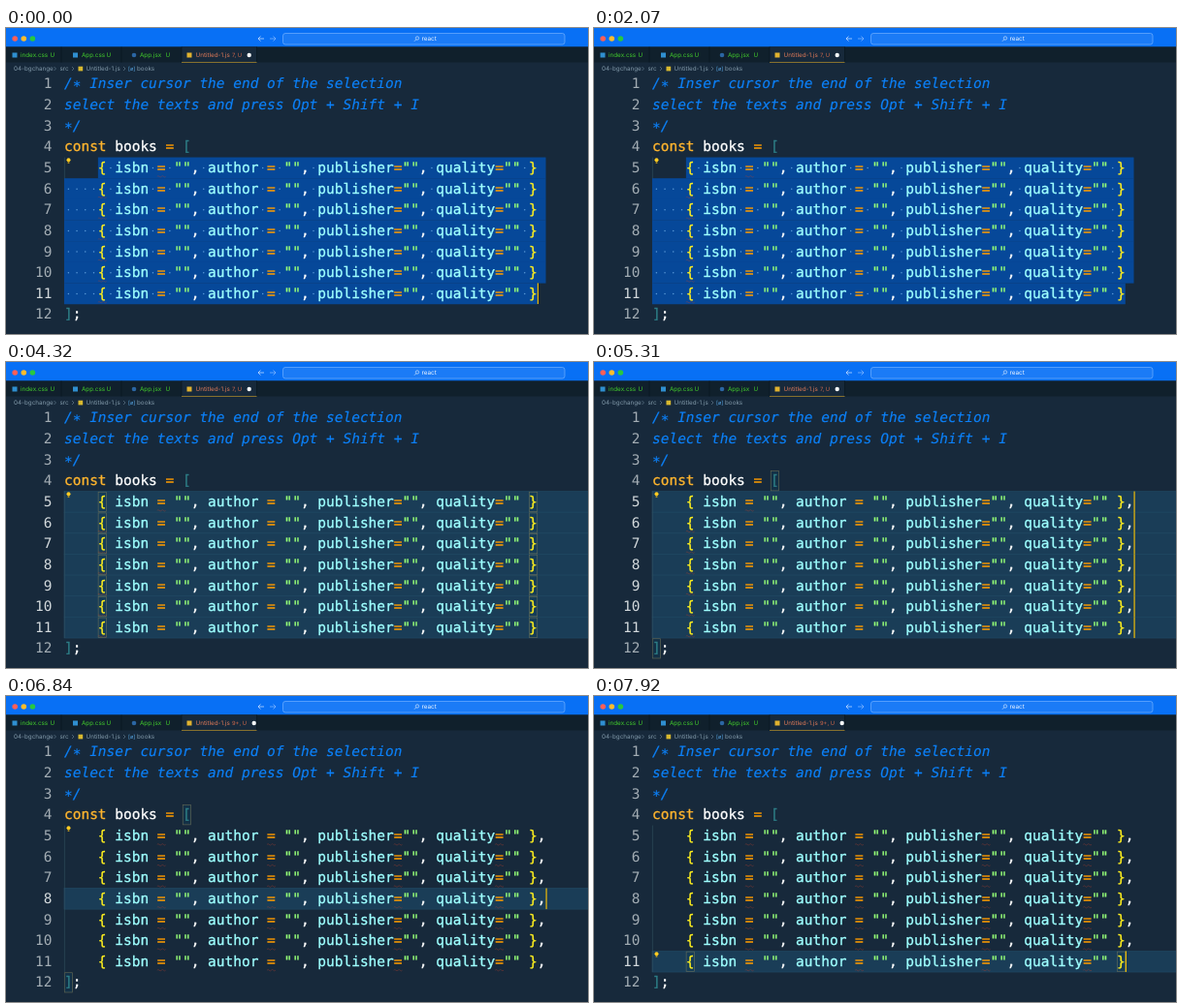
Animation, 600 px wide and 316 px high, one loop 8000 ms. Source, as an HTML page:

```html
<!DOCTYPE html>
<html lang="en">
<head>
<meta charset="utf-8">
<title>Multi-cursor editing</title>
<style>
  html, body { margin: 0; width: 100%; height: 100%; overflow: hidden; background: #17293b; }
  svg { display: block; width: 100vw; height: 100vh; }
  text { white-space: pre; text-rendering: geometricPrecision; }
  .code { font: 14.47px "DejaVu Sans Mono", "Liberation Mono", monospace; stroke-width: 0.3px; }
  .comment { font-style: italic; stroke-width: 0.15px; }
  .ui { font: 6.3px Inter, "Liberation Sans", sans-serif; }
</style>
</head>
<body>
<svg id="stage" viewBox="0 0 600 316"></svg>
<script>
const LOOP = 8000, BLINK = 500;
const LEFT = 60, TOP = 47, CHAR = 8.711, ROW = 21.64, BASELINE = 15.4;
const FIRST = 5, LAST = 11;
const ENTRY = '    { isbn = "", author = "", publisher="", quality="" }';
const END = ENTRY.length;
const EQUALS = [...ENTRY].flatMap((c, i) => c === '=' ? [i] : []);
const entries = Array.from({ length: LAST - FIRST + 1 }, (_, i) => FIRST + i);

const colX = col => LEFT + col * CHAR;
const rowY = row => TOP + (row - 1) * ROW;
const rect = (x, y, w, h, fill, extra = '') =>
  `<rect x="${x}" y="${y}" width="${w}" height="${h}" fill="${fill}" ${extra}/>`;
const circle = (x, y, r, fill) => `<circle cx="${x}" cy="${y}" r="${r}" fill="${fill}"/>`;
const path = (d, stroke, width = 0.8) =>
  `<path d="${d}" fill="none" stroke="${stroke}" stroke-width="${width}"/>`;
const label = (x, y, s, fill, extra = '') =>
  `<text class="ui" x="${x}" y="${y}" fill="${fill}" ${extra}>${s}</text>`;
// Asterisks sit at mid-height, as in the editor's typeface.
const lowerStars = s => s.replace(/\*/g, '<tspan dy="2.5">*</tspan><tspan dy="-2.5">\u200b</tspan>');
const code = (row, col, s, fill, cls = '') =>
  `<text class="code ${cls}" x="${colX(col)}" y="${rowY(row) + BASELINE}" fill="${fill}" stroke="${fill}">${lowerStars(s)}</text>`;
const group = (id, content) => `<g id="${id}">${content}</g>`;

const COLORS = {
  comment: '#0c80f8', keyword: '#ffb52e', name: '#9effff', string: '#96ff78',
  operator: '#ff9d00', brace: '#fff01f', plain: '#ffffff', outer: '#2d7d86', caret: '#ffc600'
};

function tokenColor(token) {
  if (/[{}]/.test(token)) return COLORS.brace;
  if (token === '=') return COLORS.operator;
  if (token === ',') return COLORS.plain;
  return token[0] === '"' ? COLORS.string : COLORS.name;
}

const entryCode = row => [...ENTRY.matchAll(/\w+|""|[{}=,]/g)]
  .map(m => code(row, m.index, m[0], tokenColor(m[0]))).join('');

const bracketBox = (row, col) =>
  rect(colX(col) + 0.3, rowY(row) + 0.7, CHAR - 0.4, ROW - 1.4, '#0d3a5866',
    'stroke="#7d7d5c" stroke-opacity=".7" stroke-width=".7"');

const squiggle = (row, col) =>
  path(`M${colX(col)} ${rowY(row) + 19.8}q1.1 -1.4 2.2 0t2.2 0t2.2 0t2.2 0`, '#b5412f88', 0.7);

function selection(row) {
  const from = row === FIRST ? 4 : 0;
  const to = row === LAST ? END : END + 1;
  const dots = [...ENTRY].map((c, i) =>
    c === ' ' && i >= from ? circle(colX(i + 0.5), rowY(row) + 11, 0.75, '#5c9bd8') : '').join('');
  return rect(colX(from), rowY(row), (to - from) * CHAR, ROW + 0.2, '#064899') + dots;
}

const bulb = row => circle(64.5, rowY(row) + 2.8, 2, '#ffcc22') +
  rect(63.6, rowY(row) + 4.8, 1.8, 1.4, '#d8a91a');

function windowChrome() {
  const lights = ['#ff5f57', '#febc2e', '#28c840'].map((c, i) => circle(9.2 + i * 9.1, 11, 2.8, c)).join('');
  const square = (x, fill) => rect(x, 25.5, 5, 5, fill);
  const tab = (x, name, uX) => label(x, 30, name, '#42cc2c') + label(uX, 30, 'U', '#42cc2c');
  const crumb = (x, s) => label(x, 44.3, s, '#8199a9');
  const chevron = x => path(`M${x} 40l2 2l-2 2`, '#71899a', 0.6);
  return rect(0, 0, 600, 19.5, '#0870f5') + lights +
    path('M266 11h-6m2.5 -2.5l-2.5 2.5l2.5 2.5', '#d5e7ff', 0.7) +
    path('M272 11h6m-2.5 -2.5l2.5 2.5l-2.5 2.5', '#8cbcff', 0.7) +
    rect(285.5, 5.5, 290.5, 11.5, '#1b7bf6', 'rx="2.5" stroke="#71b0ff" stroke-width=".7"') +
    `<circle cx="424" cy="10.5" r="1.7" fill="none" stroke="#e6f1ff" stroke-width=".6"/>` +
    path('M422.8 11.8l-1.8 1.9', '#e6f1ff', 0.6) + label(428.5, 13.3, 'react', '#f1f7ff') +
    rect(0, 19.5, 600, 16, '#10202c') + rect(181, 19.5, 77.5, 16, '#17293b') +
    [57, 119, 181, 258.5].map(x => path(`M${x} 19.5v16`, '#0a1720', 0.7)).join('') +
    path('M181 35.5h77.5', '#b8922b', 0.7) +
    square(6.5, '#2f8fd0') + tab(15, 'index.css', 45.5) +
    square(69, '#2f8fd0') + tab(78, 'App.css', 103.5) +
    circle(132, 28, 2.3, '#2b66a3') + tab(138, 'App.jsx', 164.5) +
    square(186.5, '#e0b22f') + label(195.5, 30, 'Untitled-1.js', '#df7a58') +
    `<text id="errors" class="ui" x="233" y="30" fill="#d0694c" style="font-size:5.8px"></text>` +
    `<circle id="dirty" cy="28" r="2.2" fill="#f4f7f8"/>` +
    crumb(8, '04-bgchange') + chevron(49.5) + crumb(55.5, 'src') + chevron(68) +
    rect(74.5, 39.7, 4.7, 4.7, '#d8b92f') + crumb(82.5, 'Untitled-1.js') + chevron(121) +
    label(126, 44, '[ø]', '#58a9e8', 'style="font-size:5.5px"') + crumb(135, 'books');
}

const lineNumbers = Array.from({ length: 12 }, (_, i) =>
  `<text id="num${i + 1}" class="code" x="47.5" y="${rowY(i + 1) + BASELINE}" text-anchor="end">${i + 1}</text>`).join('');

const fixedCode =
  code(1, 0, '/* Inser cursor the end of the selection', COLORS.comment, 'comment') +
  code(2, 0, 'select the texts and press Opt + Shift + I', COLORS.comment, 'comment') +
  code(3, 0, '*/', COLORS.comment, 'comment') +
  code(4, 0, 'const', COLORS.keyword) + code(4, 6, 'books', COLORS.plain) +
  code(4, 12, '=', COLORS.operator) + code(4, 14, '[', COLORS.outer) +
  code(12, 0, ']', COLORS.outer) + code(12, 1, ';', COLORS.plain);

const $ = id => document.getElementById(id);
$('stage').innerHTML =
  rect(0, 0, 600, 316, '#17293b') + windowChrome() +
  entries.map(r => group('line' + r,
    rect(LEFT, rowY(r), 542, ROW, '#1a3d57', 'stroke="#214a64" stroke-width=".6"'))).join('') +
  path(`M60.4 ${rowY(FIRST)}V${rowY(LAST + 1)}`, '#33505f', 0.6) +
  group('selected', entries.map(selection).join('')) +
  entries.map(r => group('boxes' + r, bracketBox(r, 4) + bracketBox(r, END - 1))).join('') +
  group('outerBoxes', bracketBox(4, 14) + bracketBox(12, 0)) +
  lineNumbers + fixedCode + entries.map(entryCode).join('') +
  entries.map(r => group('comma' + r, code(r, END, ',', COLORS.plain))).join('') +
  group('fewErrors', entries.map(r => squiggle(r, r === FIRST ? EQUALS[0] : 4)).join('')) +
  group('manyErrors', entries.flatMap(r => EQUALS.map(c => squiggle(r, c))).join('')) +
  entries.map(r => rect(0, rowY(r), 1.1, ROW, COLORS.caret, `id="caret${r}"`)).join('') +
  group('bulb5', bulb(FIRST)) + group('bulb11', bulb(LAST));

// Each step overrides the state left by the steps before it.
const steps = [
  { at: 0, rows: [LAST], col: END, selected: true, blinkFrom: -460, bulb: FIRST },
  { at: 2520, rows: entries, selected: false, braces: true, blinkFrom: 2520 },
  { at: 5040, col: END + 1, commas: true, braces: false, outer: true, blinkFrom: 5040 },
  { at: 5760, many: true },
  { at: 6120, rows: [5], blinkFrom: 6120 },
  { at: 6480, rows: [6], blinkFrom: 6480 },
  { at: 6660, rows: [7], blinkFrom: 6660 },
  { at: 6750, rows: [8], blinkFrom: 6750 },
  { at: 6930, rows: [9], blinkFrom: 6930 },
  { at: 7110, rows: [10], blinkFrom: 7110 },
  { at: 7290, rows: [11], blinkFrom: 7290 },
  { at: 7470, bulb: LAST },
  { at: 7560, col: END, lastCommaGone: true, outer: false, braces: true, blinkFrom: 7560 }
];

const show = (id, on) => { $(id).style.visibility = on ? 'visible' : 'hidden'; };

function render(t) {
  const s = Object.assign({}, ...steps.filter(step => step.at <= t));
  const caretOn = (t - s.blinkFrom) % (2 * BLINK) < BLINK;
  show('selected', s.selected);
  show('outerBoxes', s.outer);
  show('fewErrors', !s.many);
  show('manyErrors', s.many);
  show('bulb5', s.bulb === FIRST);
  show('bulb11', s.bulb === LAST);
  $('errors').textContent = s.many ? '9+, U' : '7, U';
  $('dirty').setAttribute('cx', s.many ? 255.7 : 250.7);
  for (let row = 1; row <= 12; row++)
    $('num' + row).setAttribute('fill', s.rows.includes(row) ? '#d3d9dc' : '#a3adb4');
  for (const row of entries) {
    const active = s.rows.includes(row);
    show('line' + row, active && !s.selected);
    show('boxes' + row, active && s.braces);
    show('comma' + row, s.commas && !(row === LAST && s.lastCommaGone));
    show('caret' + row, active && caretOn);
    $('caret' + row).setAttribute('x', colX(s.col));
  }
}

const start = performance.now();
function tick() {
  render((performance.now() - start) % LOOP);
  requestAnimationFrame(tick);
}
render(0);
requestAnimationFrame(tick);
</script>
</body>
</html>
```
